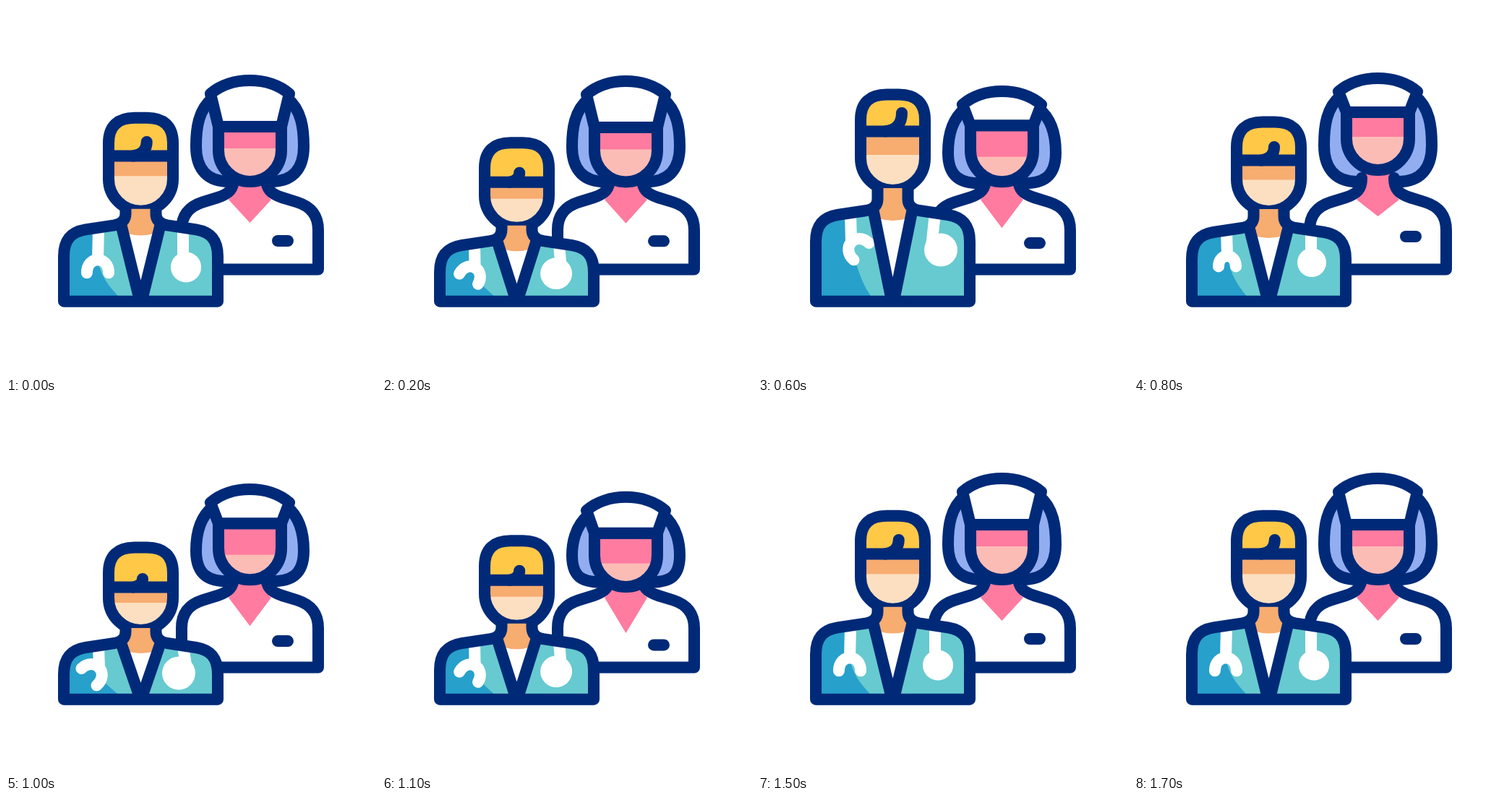
An HTML page with a canvas that plays this animation: 512 px wide and 512 px high, repeating every 1.8 s.

```html
<!DOCTYPE html>
<html lang="en">
<head>
<meta charset="utf-8">
<title>Doctor and nurse</title>
<style>
  html, body { margin: 0; width: 100%; height: 100%; overflow: hidden; background: #fff; }
  canvas { display: block; width: 512px; height: 512px; }
</style>
</head>
<body>
<canvas id="stage" width="512" height="512"></canvas>
<script>
const ctx = document.getElementById('stage').getContext('2d');
const LOOP = 1800, STEP = 100;
const NAVY = '#002a78', PINK = '#ff7ba0', ROSE = '#fcbcb6', LILAC = '#92aef0',
      GOLD = '#ffc847', PEACH = '#f7ac70', CREAM = '#fcdfc0', TEAL = '#66cad0', BLUE = '#27a0cb';

// 0 before t0, 1 after t1, smooth in between
function ease(t, t0, t1) {
  const u = Math.min(1, Math.max(0, (t - t0) / (t1 - t0)));
  return u * u * u * (u * (6 * u - 15) + 10);
}

// bob: -1 crouched, 1 stretched; still: 1 at rest, 0 while moving
function manPose(t) {
  const down = ease(t, 0, 300), up = ease(t, 300, 600),
        drop = ease(t, 600, 1000), back = ease(t, 1000, 1300);
  const bob = .15 - 1.15 * down + 2 * up - 2 * drop + 1.15 * back;
  const still = 1 - down + back;
  const band = 213 - 40 * bob;
  return {
    top: 152.5 - 38 * bob,
    band: band + .5,
    shade: 240.5 - 34.5 * bob,
    chin: 276 - 29 * bob + 4 * still,
    neck: 305 - 24 * bob,
    quiffX: 194 + 5 * bob,
    quiffY: band - 18 - 7 * bob,
    tilt: -48 * bob * (1 - still),
    forkX: 129 - 2 * still,
    forkY: 346 - 19 * bob + 8 * still,
    fork: .8 + .25 * bob * bob + .2 * still,
    discX: 246 + 7 * bob + 2 * still,
    discY: 355 - 17.5 * bob + 9 * still,
    disc: 20 + 3 * bob * bob + still
  };
}

// Dips, lifts, then plays the same motion backwards
function nursePose(t) {
  const q = 800 - Math.abs(t - 800);
  const lift = ease(q, 440, 800), dip = ease(q, 150, 440) - lift, nod = ease(q, 150, 650);
  const top = 95 + 27 * dip - 3 * lift;
  const chin = 235 + 11 * dip - 16 * lift;
  return {
    top, chin,
    band: top + 72 - 17 * nod,
    shade: chin - 38 + 13.5 * dip * (2 - dip),
    tip: 300 + 18 * dip - 9 * lift,
    badge: 325 + 9 * dip - 6 * lift,
    hair: 243 + 4 * dip
  };
}

function fill(d, color) {
  ctx.fillStyle = color;
  ctx.fill(new Path2D(d));
}

function line(d, color = NAVY, width = 16) {
  ctx.strokeStyle = color;
  ctx.lineWidth = width;
  ctx.stroke(new Path2D(d));
}

// Fills a shape, paints [y0, y1, color] bands inside it, then outlines it
function banded(d, base, bands) {
  ctx.save();
  ctx.clip(new Path2D(d));
  fill(d, base);
  for (const [y0, y1, color] of bands) {
    ctx.fillStyle = color;
    ctx.fillRect(0, y0, 512, y1 - y0);
  }
  ctx.restore();
  line(d);
}

function drawNurse({ top, band, shade, chin, tip, badge, hair }) {
  const corner = top + 26.5, wide = (corner + hair) / 2 + 12;
  const locks = `M286 ${corner + 6}C266 ${corner + 22} 263 ${corner + 48} 263 ${wide}
    C263 ${wide + 34} 281 ${hair} 308 ${hair}H367
    C394 ${hair} 412 ${wide + 34} 412 ${wide}C412 ${corner + 48} 409 ${corner + 22} 389 ${corner + 6}Z`;
  fill(locks, LILAC);
  line(locks);

  const body = `M315 238C315 253 309 260 293 265L272 271.5
    C255 277 243 288 243 310V364.5H432V310
    C432 288 420 277 403 271.5L382 265C366 260 360 253 360 238`;
  fill(body, '#fff');
  fill(`M317 232H358C358 254 358 260 367 268L337.5 ${tip}L308 268C317 260 317 254 317 232Z`, PINK);
  line(body);
  line(`M376 ${badge}H390`);

  const jaw = chin - 35.5;
  banded(`M294 ${band}V${jaw}A43.5 43.5 0 0 0 381 ${jaw}V${band}Z`, ROSE, [[band, shade, PINK]]);

  const arch = top + 1.7;
  const cap = `M283 ${corner}C311 ${arch} 364 ${arch} 392 ${corner}L381 ${band}H294Z`;
  fill(cap, '#fff');
  line(cap);
}

function drawStethoscope(p) {
  const y = p.neck + 6;
  line(`M128 ${y}L${p.forkX} ${p.forkY}`, '#fff');
  ctx.save();
  ctx.translate(p.forkX, p.forkY);
  ctx.rotate(p.tilt * Math.PI / 180);
  const w = 15 * p.fork, h = 18 * p.fork;
  line(`M${-w} ${h}C${-w} ${-h / 3} ${w} ${-h / 3} ${w} ${h}`, '#fff');
  ctx.restore();

  line(`M245 ${y}L${245 + p.tilt * .1} ${p.discY - 6}`, '#fff');
  ctx.fillStyle = '#fff';
  ctx.beginPath();
  ctx.arc(p.discX, p.discY, p.disc, 0, Math.PI * 2);
  ctx.fill();
}

function drawMan(p) {
  const { top, band, chin, neck: n } = p;
  const coat = `M165.5 ${chin + 4}V${n - 14}Q165.5 ${n - 1} 150 ${n + 2}L110 ${n + 8}
    C92 ${n + 11} 80 ${n + 20} 80 ${n + 45}V408.7H293V${n + 45}
    C293 ${n + 20} 281 ${n + 11} 263 ${n + 8}L223 ${n + 2}Q207.5 ${n - 1} 207.5 ${n - 14}V${chin + 4}`;
  fill(coat, TEAL);
  fill(`M80 408V${n + 40}Q82 ${n + 14} 108 ${n + 8}L128 ${n + 4}L${p.forkX} ${p.forkY}
    C${p.forkX + 4} ${p.forkY + 24} 144 390 162 408Z`, BLUE);
  drawStethoscope(p);
  fill(`M160 ${n}H213L186.5 402Z`, '#fff');

  const jaw = chin - 36.5;
  const head = `M142 ${jaw}V${top + 43}C142 ${top + 19} 155 ${top + 8} 178 ${top + 8}H195
    C218 ${top + 8} 231 ${top + 19} 231 ${top + 43}V${jaw}A44.5 44.5 0 0 1 142 ${jaw}Z`;
  banded(head, CREAM, [[top, band, GOLD], [band, p.shade, PEACH]]);
  line(`M142 ${band}H231`);
  line(`M${p.quiffX} ${p.quiffY}Q${p.quiffX} ${band - 3} 176 ${band}`);

  fill(`M173 ${chin + 5}H200V${n - 10}Q202 ${n} 213 ${n + 2}L206 ${n + 13}
    Q186.5 ${n + 19} 167 ${n + 13}L160 ${n + 2}Q171 ${n} 173 ${n - 10}Z`, PEACH);
  line(coat);
  line(`M160 ${n + 4}L184 403M213 ${n + 4}L189 403`);
}

function frame(now) {
  const t = Math.floor((now % LOOP) / STEP) * STEP;
  ctx.fillStyle = '#fff';
  ctx.fillRect(0, 0, 512, 512);
  ctx.lineCap = ctx.lineJoin = 'round';
  drawNurse(nursePose(t));
  drawMan(manPose(t));
}

const start = performance.now();
function tick() {
  frame(performance.now() - start);
  requestAnimationFrame(tick);
}
tick();
</script>
</body>
</html>
```
